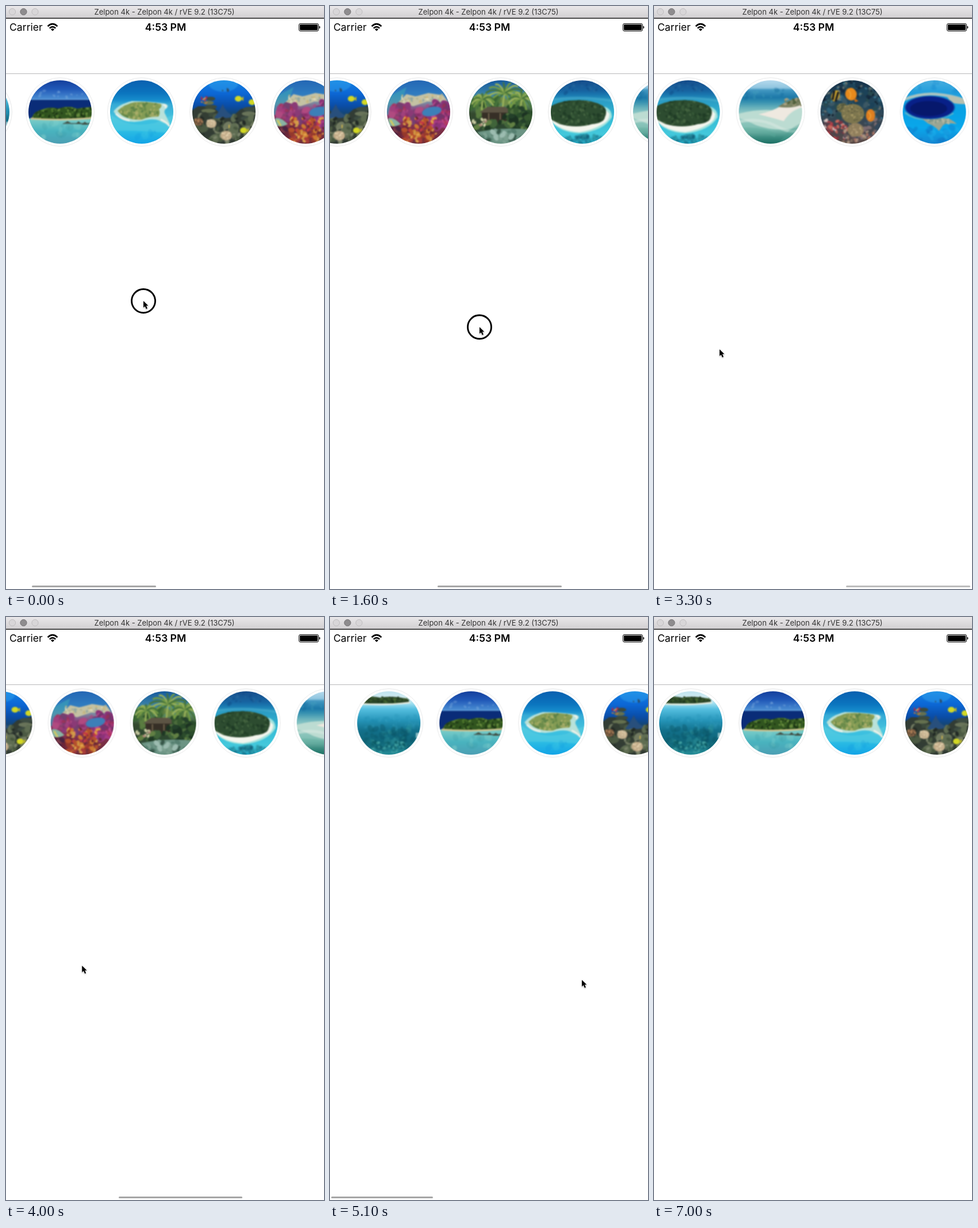
These frames come from a looping animation (553x1012 px, 7.1 s). An HTML page with a canvas:

```html
<!DOCTYPE html>
<html lang="en">
<head>
<meta charset="utf-8">
<title>Photo strip</title>
<style>
  html, body { margin: 0; width: 100%; height: 100%; overflow: hidden; background: #fff; }
  #stage { position: relative; width: 553px; height: 1012px; overflow: hidden; font-family: Inter, Roboto, sans-serif; color: #000; }
  #stage > * { position: absolute; }
  #chrome { left: 0; top: 0; }
  #title { left: 0; top: 0; width: 551px; height: 21px; line-height: 21px; text-align: center; font-size: 13px; color: #333; white-space: pre; }
  .status { top: 26px; height: 22px; line-height: 22px; font-size: 17.6px; white-space: pre; }
  #carrier { left: 6px; }
  #clock { left: 177px; width: 201px; text-align: center; font-weight: 600; }
  #strip { left: 0; top: 124px; height: 120px; will-change: transform; }
  .item { position: absolute; top: 0; width: 118px; height: 118px; border: 1px solid #e9e9e9; border-radius: 50%; }
  .item canvas { position: absolute; left: 4px; top: 4px; width: 110px; height: 110px; border-radius: 50%; }
  #bar { top: 1006px; height: 3px; border-radius: 2px; background: #a6a6a6; }
  #pointer { left: 0; top: 0; overflow: visible; }
</style>
</head>
<body>
<div id="stage">
  <svg id="chrome" width="553" height="120">
    <defs>
      <linearGradient id="metal" x2="0" y2="1"><stop stop-color="#e9e7e9"/><stop offset="1" stop-color="#d1cfd1"/></linearGradient>
    </defs>
    <rect width="553" height="21" fill="url(#metal)"/>
    <rect y="20.6" width="553" height="1.4" fill="#111"/>
    <g stroke-width="1" stroke="#bfbdbf" fill="#d8d6d8">
      <circle cx="11" cy="10" r="5.6"/>
      <circle cx="30.5" cy="10" r="5.6" fill="#8e8c8e" stroke="#757375"/>
      <circle cx="50.5" cy="10" r="5.6"/>
    </g>
    <g fill="none" stroke="#000" stroke-width="2.6">
      <path d="M72.6 35.2Q81 27.2 89.4 35.2M75.8 38.6Q81 33.6 86.2 38.6"/>
      <path d="M81 43.6L77.9 40.6Q81 38 84.1 40.6Z" fill="#000" stroke="none"/>
    </g>
    <rect x="509.5" y="30.5" width="34" height="13" rx="2.5" fill="none" stroke="#000"/>
    <rect x="511" y="32" width="31" height="10" rx="1.2"/>
    <path d="M544.6 34.6Q546.4 35 546.4 37T544.6 39.4Z"/>
    <rect y="117" width="553" height="1" fill="#b9b9bb"/>
  </svg>
  <div id="title">Zelpon 4k - Zelpon 4k / rVE 9.2 (13C75)</div>
  <div id="carrier" class="status">Carrier</div>
  <div id="clock" class="status">4:53 PM</div>
  <div id="strip"></div>
  <div id="bar"></div>
  <svg id="pointer" width="1" height="1">
    <circle id="ring" r="20.5" fill="none" stroke="#000" stroke-width="2.9"/>
    <path d="M0 0V11.6L2.7 9.2L4.8 13.9L6.9 13L4.9 8.3H8.4Z" stroke="#fff" paint-order="stroke" style="filter:drop-shadow(0 1px 1px #0004)"/>
  </svg>
</div>
<script>
const $ = id => document.getElementById(id);
const SIZE = 110, PITCH = 142.5, MAX = 859.5, LOOP = 7100, STEP = 100;

let ctx, seed;
const rnd = () => (seed = (seed * 16807) % 2147483647) / 2147483647;

function sky(...stops) {
  const g = ctx.createLinearGradient(0, 0, 0, SIZE);
  stops.forEach(([at, color]) => g.addColorStop(at, color));
  ctx.fillStyle = g;
  ctx.fillRect(0, 0, SIZE, SIZE);
}
function oval(x, y, rx, ry, color, turn = 0) {
  ctx.fillStyle = color;
  ctx.beginPath();
  ctx.ellipse(x, y, rx, ry, turn, 0, 7);
  ctx.fill();
}
function shape(path, color) {
  ctx.fillStyle = color;
  ctx.fill(new Path2D(path));
}
function line(path, color, width) {
  ctx.strokeStyle = color;
  ctx.lineWidth = width;
  ctx.stroke(new Path2D(path));
}
// Scatter small blobs over a box
function scatter(n, x, y, w, h, r, colors) {
  const list = colors.split(' ');
  for (let i = 0; i < n; i++) {
    const k = r * (0.5 + rnd() * 0.7);
    oval(x + rnd() * w, y + rnd() * h, k * 1.2, k * 0.8, list[i % list.length], rnd() * 3);
  }
}
function scatterIn(path, ...args) {
  ctx.save();
  ctx.clip(new Path2D(path));
  scatter(...args);
  ctx.restore();
}
// Rounded coral head with a speckled surface
function coral(x, y, r, base, light) {
  oval(x, y, r, r * 0.85, base);
  scatter(r * 3, x - r * 0.8, y - r * 0.7, r * 1.6, r * 1.3, 1.3, light);
}
function soften(pic) {
  ctx.filter = 'blur(0.9px)';
  ctx.drawImage(pic, 0, 0);
}

const scenes = [
  function lagoon() {
    sky([0, '#bfe3ee'], [.12, '#d8eff4'], [.2, '#9adcee'], [.28, '#55bfe0'], [.45, '#2796ba'], [.62, '#12708a'], [.8, '#0f6578'], [1, '#268d98']);
    shape('M8 12Q24 7 40 11Q64 7 90 14V20Q50 22 8 21Z', '#2a4527');
    scatter(45, 12, 10, 76, 9, 2, '#1d361d #3c5c2c #4a6b35');
    shape('M4 20Q50 24 92 18V21Q50 26 4 23Z', '#e8eee2');
    scatter(50, 0, 42, 110, 22, 3, '#1b84a82a #49b3cc2a');
    scatter(55, 8, 60, 90, 42, 5, '#0a4d5f55 #0d5a6966 #39a3a544');
    scatter(55, 25, 84, 60, 22, 2.4, '#0a565f88 #57b8b288');
    ctx.fillStyle = '#8dbdc4';
    ctx.fillRect(102, 72, 8, 9);
  },
  function shore() {
    sky([0, '#143f9c'], [.14, '#2159b8'], [.28, '#4688d0'], [.32, '#6ba5dc']);
    scatter(12, 18, 18, 80, 12, 2.3, '#a9cdec44');
    ctx.fillStyle = '#0a2c78';
    ctx.fillRect(0, 34, 110, 34);
    const g = ctx.createLinearGradient(0, 66, 0, 110);
    g.addColorStop(0, '#7fcfca'); g.addColorStop(.5, '#49b3bf'); g.addColorStop(1, '#4c9fb3');
    ctx.fillStyle = g;
    ctx.fillRect(0, 66, 110, 44);
    const trees = 'M6 64Q12 52 26 50Q38 45 52 49Q70 43 84 49L110 46V67Q50 70 6 66Z';
    shape(trees, '#31551f');
    scatterIn(trees, 110, 6, 46, 104, 21, 2.4, '#223f18 #4b732a #64883b #1c3514');
    shape('M4 65Q50 69 110 64V67Q60 72 4 68Z', '#cfc493');
    scatter(16, 15, 74, 80, 28, 6, '#8ad7cf44 #36949f33');
    shape('M62 74L68 71L74 74ZM82 76L87 71L93 76ZM92 77L98 72L105 77Z', '#3f4a3c');
    line('M60 75H108', '#425650', 1.5);
  },
  function island() {
    sky([0, '#0a60b0'], [.2, '#0b74be'], [.31, '#168ccc'], [.38, '#36abd6'], [.6, '#44c2de'], [.8, '#2bbce4'], [1, '#12a4e6']);
    shape('M0 58Q30 84 78 74L110 60V92Q50 86 0 88Z', '#5ed0e077');
    shape('M6 54Q14 42 38 36Q64 36 92 40Q104 42 99 48Q91 53 97 61L104 76Q96 76 86 70Q76 66 62 69Q46 74 30 71Q14 68 6 54Z', '#b9e2da');
    line('M10 58Q18 67 34 70M92 43Q99 42 96 48M88 68Q96 71 104 80', '#eef2ea', 3);
    const land = 'M13 53Q24 42 42 38Q64 36 88 41Q92 45 85 50Q88 58 84 63Q66 63 56 68Q40 69 30 65Q20 62 13 53Z';
    shape(land, '#849c55');
    scatterIn(land, 90, 14, 38, 74, 32, 2.8, '#6b8b4a #98a55c #aaae6a #5f8448');
    scatter(8, 20, 88, 70, 20, 5, '#45cbe833 #0c8fdc33');
  },
  function reef() {
    sky([0, '#127fe0'], [.2, '#0c68d6'], [.4, '#0a4da8'], [.6, '#1a4258'], [1, '#3a4438']);
    oval(54, 5, 26, 15, '#3eb4f255');
    scatter(5, 52, 14, 10, 4, 1.8, '#2c4f6e');
    shape('M0 52L10 45H36L48 58L66 66L84 50L110 44V110H0Z', '#323c34');
    for (let i = 0; i < 5; i++) {
      oval(32 - i % 2 * 4, 32 + i * 7, 8 + i * 1.5, 3.5, i % 2 ? '#64704f' : '#3d4a3c');
      oval(100 - i * 2, 50 + i * 8, 12, 4, i % 2 ? '#69745a' : '#3d4c42');
    }
    scatter(28, 2, 64, 106, 46, 9, '#4c5a43 #5f6d52 #333d33 #717a60');
    scatter(40, 2, 62, 106, 46, 3.5, '#222a25 #7b846a #48573f');
    shape('M38 65Q47 54 53 41Q58 56 70 61Q60 69 53 63Q46 68 38 65Z', '#284f7c');
    coral(11, 72, 8, '#806043', '#b4835a #574434');
    coral(33, 75, 9, '#c3b08e', '#e2d2b0 #cfb591');
    coral(59, 96, 10, '#bfaa88', '#e8d6b4 #cdb18c');
    scatter(10, 14, 26, 12, 14, 2, '#b03a5a #8f2a58 #b07a4a');
    line('M18 34L23 30M64 77V83', '#c7b04c', 2);
    for (const [x, y] of [[80, 32], [104, 38], [89, 87]]) {
      oval(x, y, 6, 5, '#d3d824');
      shape(`M${x + 4} ${y}l5 -4v8z`, '#b9b52a');
    }
  },
  function garden() {
    sky([0, '#2467b4'], [.22, '#2f7cc0'], [.36, '#7c88a0'], [.46, '#8a4a80'], [.7, '#84304e'], [1, '#6a2c38']);
    shape('M0 30L34 12L26 36L10 60H0Z', '#3aa0b8aa');
    shape('M20 38L34 24L50 28L72 22L98 26L106 38L70 37L46 45Z', '#c4c2a4');
    scatter(40, 24, 25, 74, 13, 2.2, '#e2dcb8 #b4b494 #cbb880 #94a8a0');
    scatter(26, 8, 46, 50, 26, 7, '#a0407c #8a3a76 #74406f #b04a80');
    scatter(34, 74, 40, 36, 40, 7, '#a43a86 #8a3378 #c04a90 #74346c');
    scatter(60, 10, 42, 100, 34, 3, '#b83a7c88 #7b286088 #a82e4a88');
    oval(78, 54, 17, 8, '#3d7fb8', -.2);
    scatter(30, 4, 78, 36, 32, 6, '#4a2340 #6b2638 #7c3a48');
    scatter(55, 30, 68, 50, 42, 4.5, '#b4502c #cc7a30 #94382c #d09a48 #a83c38');
    scatter(40, 30, 64, 60, 46, 2.4, '#e0a04a #6c2834 #c43a44');
    shape('M2 66Q12 63 24 76Q12 83 2 78Z', '#88b4a4');
    line('M6 69L12 79', '#d8cc5c', 3);
  },
  function hut() {
    sky([0, '#165a9e'], [.22, '#3a82a8'], [.38, '#5a8862'], [.52, '#34492e'], [.75, '#2c4630'], [1, '#4a6a58']);
    scatter(36, 0, 32, 110, 28, 7, '#3a6434 #5a7c40 #2a4c2a #6f8c48');
    // Palm crowns: arched fronds around a centre
    for (const [x, y, r] of [[62, 22, 34], [24, 34, 20], [92, 32, 24]])
      for (let i = 0; i < 15; i++) {
        const a = i * 0.42, dx = Math.cos(a) * r, dy = Math.sin(a) * r * 0.65;
        line(`M${x} ${y}q${dx * .6} ${dy * .6 - 7} ${dx} ${dy + 5}`, ['#739a44', '#98b05a', '#48743c'][i % 3], 3.2);
      }
    shape('M18 56L32 46H62L78 56Z', '#5c5444');
    shape('M22 56H74V74H22Z', '#362f26');
    line('M34 57V73M54 57V73', '#75684f', 2);
    scatter(34, 56, 52, 54, 26, 6, '#24402a #36582f #1c3222 #4c6c3c');
    scatter(40, 0, 72, 110, 14, 5, '#2c4c2c #40643a #1e3824 #628044');
    scatter(14, 0, 68, 32, 10, 2.5, '#c8cba0 #b08a7c #d8d8b0');
    shape('M14 90Q60 80 108 86L96 110H34Z', '#6c9484');
    scatter(30, 20, 86, 70, 22, 5, '#9cbcb0 #567f70 #38584a #7ca090');
  },
  function islet() {
    sky([0, '#164d8b'], [.17, '#1765a2'], [.24, '#1b7cb2'], [.32, '#2a9cc4'], [.6, '#34bcd6'], [.85, '#44c9dc'], [1, '#209fb9']);
    scatter(25, 10, 2, 90, 20, 3, '#0c417d66 #2c709f55');
    line('M0 34Q50 26 110 36', '#61bfd755', 4);
    shape('M0 70Q14 90 50 92Q92 88 106 64Q106 50 94 46L0 56Z', '#a5e4de');
    shape('M0 70Q16 88 50 90Q74 86 90 76Q102 70 102 58L92 48L0 60Z', '#f4f6ee');
    const land = 'M-4 48Q8 38 34 35Q70 32 90 44Q100 52 94 64Q92 74 72 76Q44 84 16 76L-4 66Z';
    shape(land, '#2d4c30');
    scatterIn(land, 120, -4, 33, 104, 46, 2.6, '#244328 #385a38 #446440 #203c26');
    scatter(45, 24, 95, 64, 13, 3.3, '#17748d77 #2993a088 #115b7477');
  },
  function sandbar() {
    sky([0, '#b5d9ed'], [.12, '#90c5e0'], [.15, '#4398c2'], [.27, '#1c78a8'], [.34, '#3590b0'], [.44, '#6cb4bc'], [.55, '#9ccfc8'], [.78, '#7cbcb0'], [.9, '#3c8c80'], [1, '#1c7064']);
    scatter(18, 0, 17, 85, 15, 4, '#0e679844 #4ca9c044');
    shape('M0 58Q30 50 60 52L110 36V80Q70 92 30 78Q10 68 0 66Z', '#bcdcd2');
    shape('M34 59Q58 54 74 44L110 34V47Q90 52 78 71Q62 66 34 59Z', '#efe9e0');
    shape('M68 46Q86 33 110 29V42Q91 50 68 46Z', '#7a8060');
    scatter(26, 80, 32, 30, 12, 2.4, '#50603c #7c8462 #a8a080');
    line('M0 72Q36 64 66 80T110 82', '#dcebe388', 5);
    line('M8 86Q42 84 64 96', '#58a89a66', 7);
    shape('M110 74Q84 84 70 110H110Z', '#4c9c8e66');
  },
  function fishes() {
    sky([0, '#16324a'], [.4, '#24485c'], [.7, '#3c4650'], [1, '#5a4a46']);
    scatter(70, 0, 0, 110, 66, 5, '#1c4258 #2c6078 #162c40 #3c5864 #284a50');
    scatter(80, 0, 0, 110, 70, 2, '#3a7890 #101e2c #6a7470');
    scatter(30, 64, 66, 46, 34, 5, '#4a5a68 #7c6c70 #33485a');
    scatter(60, 6, 70, 40, 32, 3, '#b04048 #d8c4c0 #7c3440 #c8685c #54404a');
    scatter(50, 40, 86, 56, 24, 3, '#8b7664 #ac9682 #64545a #a87464');
    coral(38, 48, 10, '#5f6244', '#8f8858 #4a5038');
    coral(56, 58, 20, '#7d764e', '#aa9c68 #8c8258 #5c5a40');
    coral(61, 86, 14, '#8f7e5c', '#bca880 #9a8460');
    oval(53, 24, 10, 11, '#e88a1c', -.3);
    oval(87, 61, 8, 11, '#e07f20');
    shape('M58 30L66 36L60 38Z', '#cd6a12');
    line('M48 17Q56 23 50 32M83 55Q91 61 84 68', '#f0a83c', 1.5);
    oval(26, 27, 7, 10, '#d0a62c', .4);
    line('M24 18L21 34M31 20L26 37', '#151923', 3.5);
  },
  function hole() {
    sky([0, '#48addf'], [.2, '#1f9edd'], [.5, '#08a2e5'], [.75, '#0aa7eb'], [1, '#1586d1']);
    scatter(18, 0, 0, 110, 20, 6, '#58bde444 #1287cf44');
    line('M-2 35Q28 22 58 24Q86 26 112 36', '#a9c4c0', 5);
    shape('M76 27Q96 28 110 34V41Q95 42 84 38Z', '#b6c0b0');
    line('M4 56Q18 67 40 68Q67 69 88 57', '#58b4cc', 3);
    shape('M34 67Q52 66 70 66Q82 64 94 76Q78 72 70 78L63 88Q56 79 44 75Z', '#98a594');
    scatter(30, 44, 68, 36, 7, 2.4, '#b4b8a2 #7c9689');
    oval(47, 47, 44, 20.5, '#0e5cb0');
    oval(47, 47, 42, 19, '#082088');
    oval(45, 49, 32, 13, '#06186c');
    scatter(26, 4, 82, 100, 26, 6, '#1279ca66 #24b9f055 #0c69bb55');
  }
];

scenes.forEach((draw, i) => {
  const item = document.createElement('div'), pic = document.createElement('canvas');
  item.className = 'item';
  item.style.left = 4 + i * PITCH + 'px';
  pic.width = pic.height = SIZE;
  ctx = pic.getContext('2d');
  seed = 1234 + i * 977;
  draw();
  soften(pic);
  item.append(pic);
  $('strip').append(item);
});

// Each key: time, value, and 1 for a decelerating approach to that value
const scroll = [
  [0, 113], [200, 152], [500, 155, 1], [700, 155], [1000, 259], [1200, 345],
  [1500, 400, 1], [1800, 640], [2300, 847, 1], [2500, 853],
  [2800, 930, 1], [3150, MAX, 1], [3500, MAX], [3800, 671],
  [4400, 430, 1], [4600, 401.5], [4900, 184], [5150, -40, 1], [5500, 0, 1]
];
const handX = [
  [0, 239], [200, 200], [650, 300, 1], [700, 300], [1000, 196], [1200, 110],
  [1500, 340], [1800, 100], [2300, 364, 1], [2500, 368], [2800, 130], [3300, 114, 1],
  [3500, 112], [3800, 300], [4300, 86, 1], [4400, 84], [4600, 113], [4900, 330], [5400, 600]
];
const handY = [[0, 512], [1000, 530], [2300, 589], [3300, 596], [4600, 613], [5400, 640]];
const fade = [[0, 1], [3200, 1], [3400, .5], [3499, .3], [3500, 1], [5500, 1], [5700, .43], [5850, 0]];
const presses = [[0, 200], [700, 1200], [1500, 1800], [2500, 2800], [3500, 3800], [4400, 4900]];

function at(keys, t) {
  const i = keys.findIndex(k => k[0] > t);
  if (i < 0) return keys[keys.length - 1][1];
  const [t0, a] = keys[i - 1], [t1, b, slow] = keys[i];
  const p = (t - t0) / (t1 - t0);
  return a + (b - a) * (slow ? 1 - (1 - p) ** 3 : p);
}

function render(t) {
  const x = at(scroll, t);
  const inside = Math.min(MAX, Math.max(0, x)), over = Math.abs(x - inside);
  $('strip').style.transform = `translateX(${-x}px)`;
  const bar = $('bar').style;
  bar.left = 1.5 + inside * .387 + (x > MAX ? over : 0) + 'px';
  bar.width = 215.5 - over + 'px';
  bar.opacity = at(fade, t);
  $('pointer').style.transform = `translate(${at(handX, t)}px, ${at(handY, t)}px)`;
  $('ring').style.display = presses.some(([a, b]) => t >= a && t < b) ? '' : 'none';
}

const start = performance.now();
function tick(now) {
  const t = Math.max(0, now - start) % LOOP;
  render(Math.floor(t / STEP) * STEP);
  requestAnimationFrame(tick);
}
render(0);
requestAnimationFrame(tick);
</script>
</body>
</html>
```
